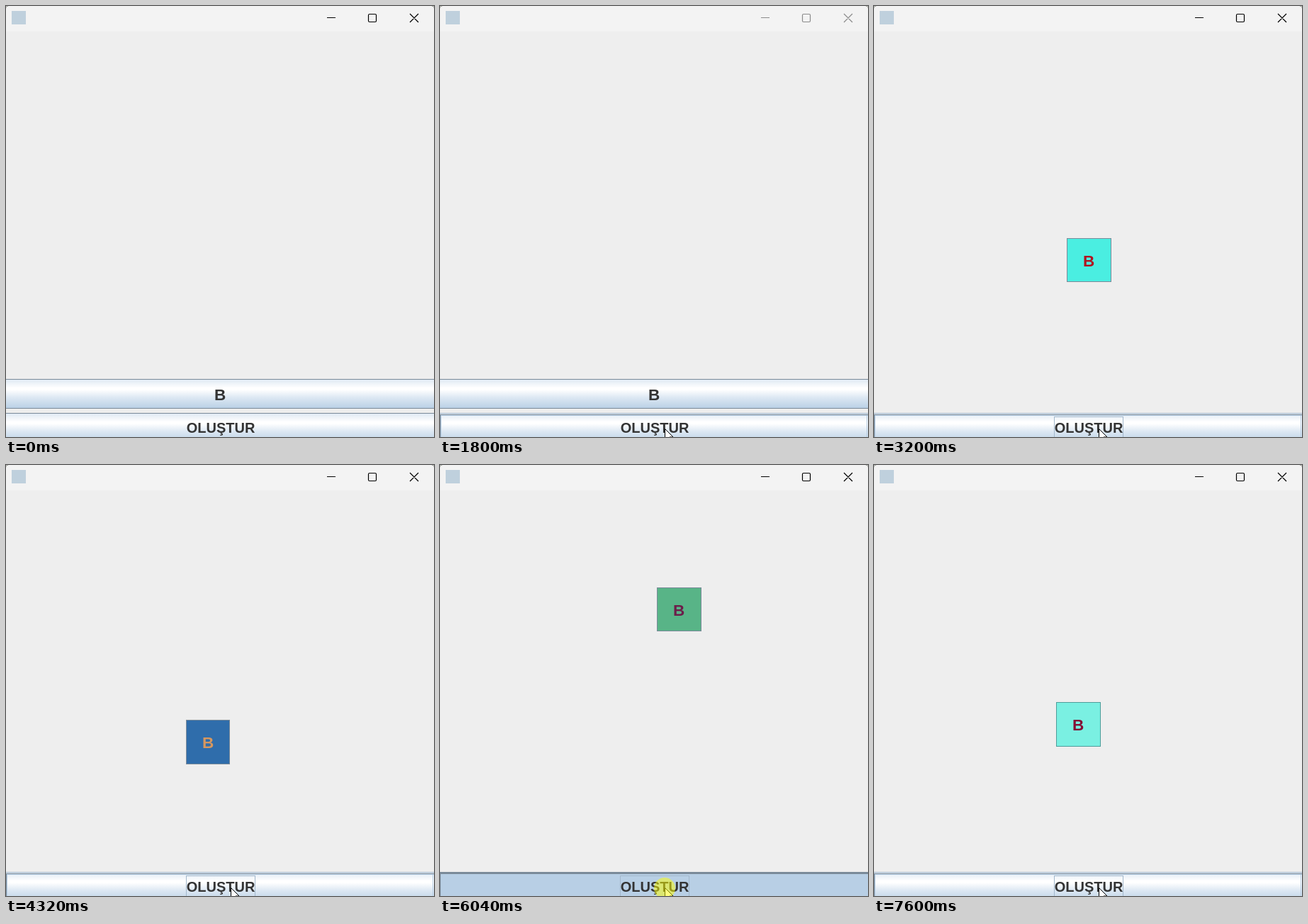
Write an HTML page with a canvas that moves like this. It is 604 px wide and 609 px high and loops after 8 s.

```html
<!DOCTYPE html>
<html lang="tr">
<head>
<meta charset="utf-8">
<title>Buton</title>
<style>
html, body { margin: 0; width: 100%; height: 100%; overflow: hidden; background: #eee; }
canvas { display: block; width: 604px; height: 609px; }
</style>
</head>
<body>
<canvas id="stage" width="604" height="609"></canvas>
<script>
const W = 604, H = 609, LOOP = 8000;
const ctx = document.getElementById('stage').getContext('2d');
const EDGE = '#7a8a99', PALE = '#b8cfe5', SOFT = '#a3b8cc', INK = '#333';
const FONT = '"Liberation Sans", Arial, sans-serif';

// Each click: press time, release time, then the box it leaves behind.
const clicks = [
  { down: 2120, up: 2280, x: 352, y: 294, w: 63, h: 62, fill: '#a8c64d', ink: '#5b2a8c' },
  { down: 3080, up: 3200, x: 272, y: 328, w: 63, h: 62, fill: '#4aeee1', ink: '#b0121f' },
  { down: 3600, up: 3720, x: 330, y: 402, w: 63, h: 62, fill: '#d9a441', ink: '#22408e' },
  { down: 4200, up: 4320, x: 254, y: 360, w: 62, h: 63, fill: '#2f6dab', ink: '#d6975f' },
  { down: 4680, up: 4720, x: 422, y: 479, w: 63, h: 63, fill: '#c46dd6', ink: '#3f8a2f', foot: 2 },
  { down: 5400, up: 5480, x: 306, y: 173, w: 63, h: 62, fill: '#58b487', ink: '#6c1d4a' },
  { down: 6000, up: 6120, x: 368, y: 453, w: 63, h: 62, fill: '#e0796b', ink: '#1f4f66' },
  { down: 6520, up: 6640, x: 202, y: 488, w: 63, h: 62, fill: '#050a5c', ink: '#f7f59b' },
  { down: 7440, up: 7600, x: 257, y: 335, w: 63, h: 63, fill: '#7af0e2', ink: '#850c34', edge: '#4d9c9a' }
];

// Pointer way points: time, x, y.
const path = [
  [320, 606, 300], [560, 505, 372], [800, 385, 488], [1000, 326, 543],
  [1280, 326, 543], [1560, 318, 588], [1740, 318, 588], [1800, 317, 597]
];

function rect(x, y, w, h, color) {
  ctx.fillStyle = color;
  ctx.fillRect(x, y, w, h);
}

function frame(x, y, w, h, color) {
  ctx.strokeStyle = color;
  ctx.lineWidth = 1;
  ctx.strokeRect(x + .5, y + .5, w - 1, h - 1);
}

function label(text, x, base, size, color) {
  ctx.font = `bold ${size}px ${FONT}`;
  ctx.textAlign = 'center';
  ctx.fillStyle = color;
  ctx.fillText(text, x, base);
}

function pointerAt(t) {
  if (t < path[0][0]) return null;
  t = Math.floor(t / 40) * 40;
  const i = path.findIndex(p => p[0] > t);
  if (i < 0) return path[path.length - 1].slice(1);
  const [t0, x0, y0] = path[i - 1], [t1, x1, y1] = path[i];
  const k = (t - t0) / (t1 - t0);
  return [Math.round(x0 + (x1 - x0) * k), Math.round(y0 + (y1 - y0) * k)];
}

function drawWindow(active) {
  rect(0, 0, W, H, '#eeeeee');
  rect(0, 0, W, 36, '#f3f3f3');
  rect(0, 0, 3, 1, '#a9aca6');
  rect(0, 1, 1, 2, '#c4c6c0');
  rect(W - 3, 0, 3, 1, '#a9aca6');
  rect(W - 1, 1, 1, 2, '#c4c6c0');
  rect(8, 7, 20, 19, '#bfd0dd');

  const ink = active ? '#000' : '#8b8b8b';
  rect(453, 16, 12, 1, ink);
  ctx.strokeStyle = ink;
  ctx.lineWidth = 1.2;
  ctx.beginPath();
  ctx.roundRect(511.5, 11.5, 11, 11, 1.5);
  ctx.moveTo(570, 11);
  ctx.lineTo(582, 23);
  ctx.moveTo(582, 11);
  ctx.lineTo(570, 23);
  ctx.stroke();
}

function drawBar(y, h, { hover, pressed }) {
  if (pressed) {
    rect(0, y, W, h, PALE);
    rect(0, y, W, 3, EDGE);
    rect(0, y, 1, h, EDGE);
    return;
  }
  const g = ctx.createLinearGradient(0, y, 0, y + h);
  [[0, '#dde8f3'], [.3, '#fff'], [.36, '#fff'], [.62, '#dde8f3'], [1, PALE]]
    .forEach(([at, color]) => g.addColorStop(at, color));
  rect(0, y, W, h, g);
  if (!hover) {
    rect(0, y, W, 1, EDGE);
    rect(0, y + h - 1, W, 1, EDGE);
    return;
  }
  rect(0, y, W, 1, SOFT);
  rect(0, y + 1, W, 1, '#e3eaf1');
  frame(1, y + 2, W - 2, h - 4, PALE);
  rect(0, y + 2, W, 1, EDGE);
  rect(0, y + 3, W, 1, PALE);
  rect(0, y + 2, 1, h - 4, EDGE);
  rect(0, y + h - 1, W, 1, SOFT);
}

function drawBox(b) {
  rect(b.x, b.y, b.w, b.h, b.edge || EDGE);
  rect(b.x + 1, b.y + 1, b.w - 2, b.h - 1 - (b.foot || 1), b.fill);
  label('B', b.x + 31, b.y + 40, 22.5, b.ink);
}

function drawPointer(x, y) {
  ctx.beginPath();
  [[0, 0], [0, 16], [4, 12.5], [6.5, 18.5], [9, 17.5], [6.5, 11.5], [11.5, 11.5]]
    .forEach(([dx, dy]) => ctx.lineTo(x + .5 + dx, y + .5 + dy));
  ctx.closePath();
  ctx.fillStyle = '#fff';
  ctx.fill();
  ctx.strokeStyle = '#000';
  ctx.lineWidth = 1;
  ctx.stroke();
}

function draw(t) {
  const active = t < 240 || t >= 2120;
  const pressed = clicks.some(c => t >= c.down && t < c.up);
  const box = clicks.filter(c => t >= c.up).pop();
  const pointer = pointerAt(t);
  const over = (top, h) => !!pointer && pointer[1] >= top && pointer[1] < top + h;

  drawWindow(active);
  if (box) {
    drawBox(box);
  } else {
    drawBar(527, 42, { hover: over(527, 42) });
    label('B', 302, 557, 22.5, INK);
    if (t >= 80 && t < 240) frame(292, 532, 20, 32, SOFT);
  }

  drawBar(575, 42, { hover: over(575, 42), pressed });
  label('OLUŞTUR', 303, 603, 20, INK);
  if (t >= 2120) frame(254, 580, 98, 32, SOFT);

  if (pointer) drawPointer(...pointer);
  if (pressed) {
    ctx.fillStyle = 'rgba(255, 255, 0, .5)';
    ctx.beginPath();
    ctx.arc(317, 598, 15, 0, Math.PI * 2);
    ctx.fill();
  }
}

const start = performance.now();
function tick() {
  draw((performance.now() - start) % LOOP);
  requestAnimationFrame(tick);
}
tick();
</script>
</body>
</html>
```
